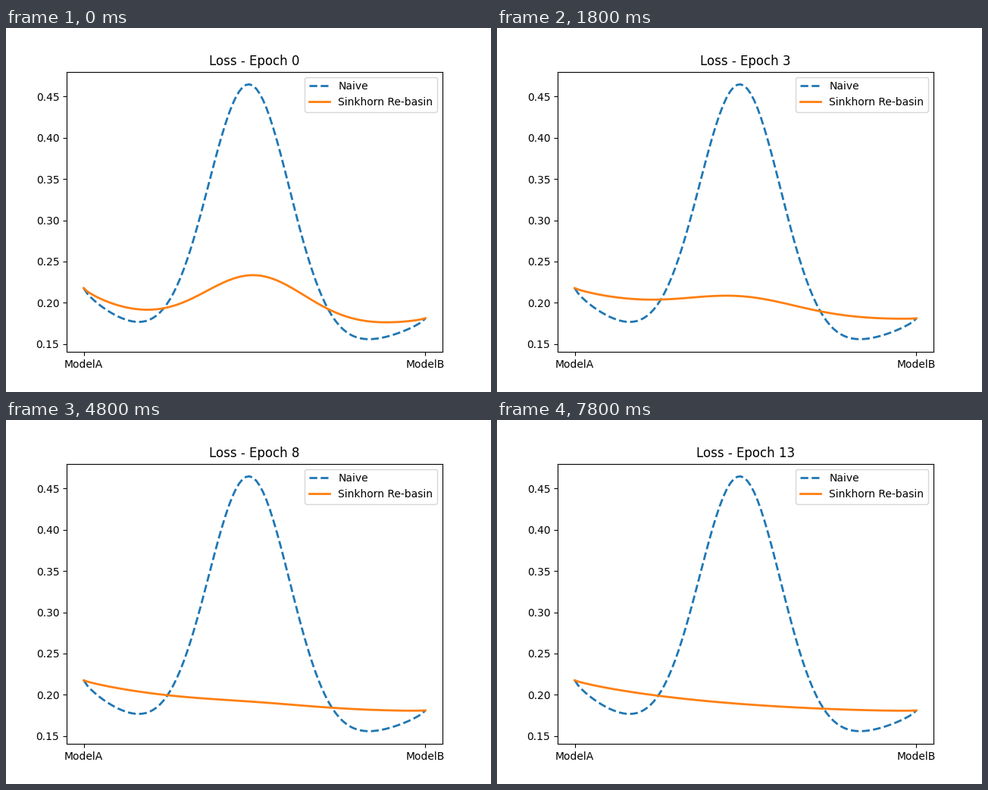
Animation, 640 px wide and 480 px high, one loop 8 s. Source, as a matplotlib script:

```python
import numpy as np
import matplotlib.pyplot as plt
from matplotlib.animation import FuncAnimation

INTERVAL = 200          # ms per frame
FRAMES = 40
FRAMES_PER_EPOCH = 3

LOSS_A, LOSS_B = 0.2176, 0.1811
START_HEIGHT = 0.0667   # barrier height before training

mix = np.linspace(0, 1, 100)


def loss(height, centre, spread, sag, tilt):
    """Straight path between the models, sagging, with a bell-shaped barrier."""
    line = LOSS_A + (LOSS_B - LOSS_A) * mix
    dip = (sag - tilt * mix) * (mix * (1 - mix)) ** 0.78
    bell = height * np.exp(-(mix - centre) ** 2 / spread)
    return line - dip + bell


def rebasin_loss(epoch):
    """The barrier melts away and the sag shrinks with its square."""
    height = np.interp(epoch, [0, 2, 4, 6, 8, 10],
                       [START_HEIGHT, 0.0355, 0.0072, 0.0025, 0.003, 0])
    centre = np.interp(epoch, [0, 2, 4], [0.5, 0.465, 0.51])
    spread = np.interp(epoch, [0, 2, 4], [0.046, 0.058, 0.05])
    rest = (height / START_HEIGHT) ** 2
    return loss(height, centre, spread,
                sag=0.041 + 0.09 * rest, tilt=0.018 + 0.052 * rest)


fig, ax = plt.subplots(figsize=(6.4, 4.8), dpi=100)
naive = loss(height=0.329, centre=0.484, spread=0.0288, sag=0.218, tilt=0.06)
ax.plot(mix, naive, "--", lw=2, label="Naive")
curve, = ax.plot(mix, rebasin_loss(0), lw=2, label="Sinkhorn Re-basin")
ax.set_xlim(-0.05, 1.05)
ax.set_ylim(0.1404, 0.4802)
ax.set_xticks([0, 1], ["ModelA", "ModelB"])
ax.legend(loc="upper right")
title = ax.set_title("Loss - Epoch 0")


def update(frame):
    epoch = frame // FRAMES_PER_EPOCH
    curve.set_ydata(rebasin_loss(epoch))
    title.set_text(f"Loss - Epoch {epoch}")
    return curve, title


anim = FuncAnimation(fig, update, frames=FRAMES, interval=INTERVAL,
                     repeat=True, repeat_delay=0, blit=False)
plt.show()
```
